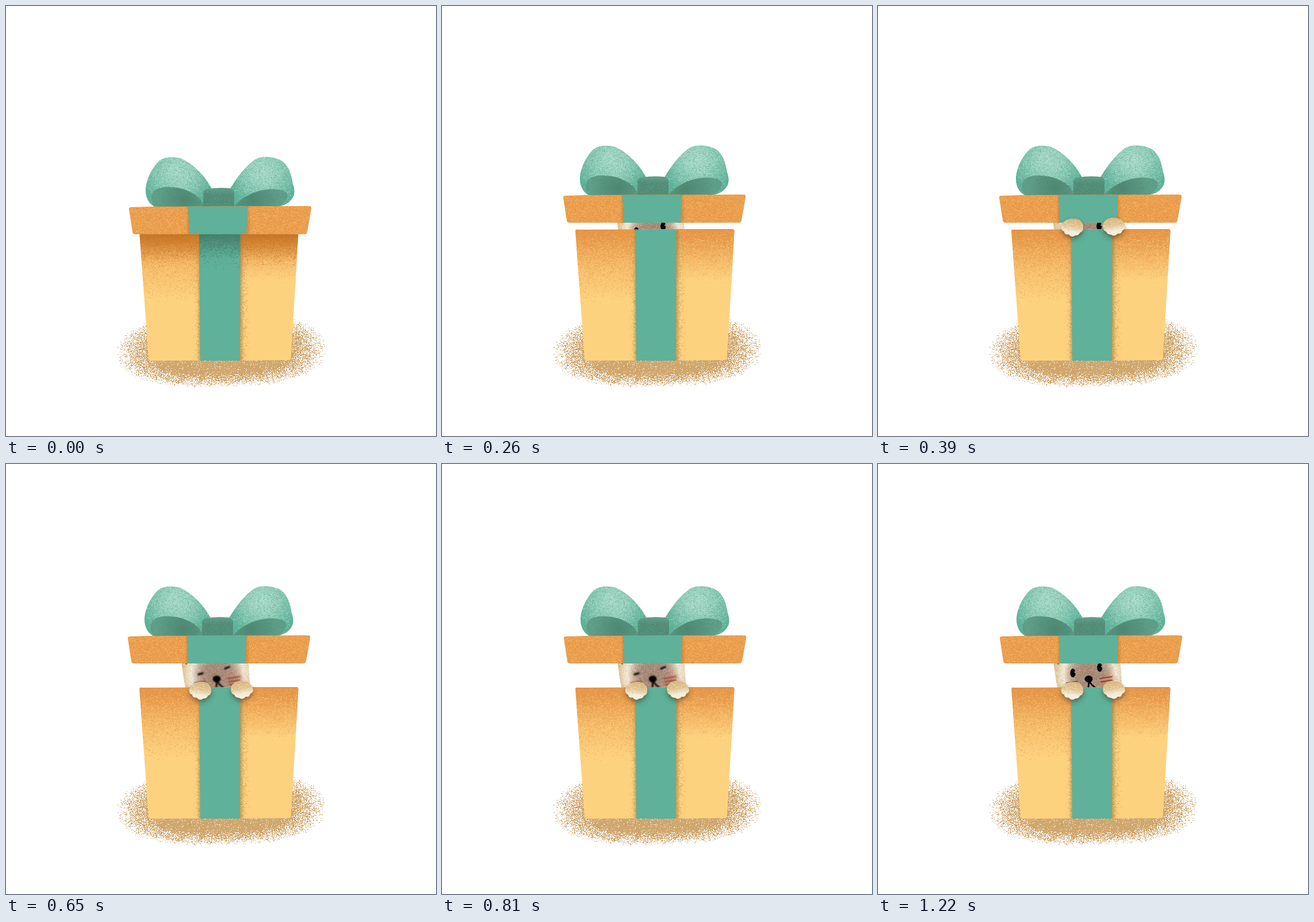
Write an HTML page with a canvas that moves like this. It is 748 px wide and 748 px high and loops after 1430 ms.

```html
<!DOCTYPE html>
<html lang="en">
<head>
<meta charset="utf-8">
<title>Gift box</title>
<style>
html, body { margin: 0; width: 100%; height: 100%; overflow: hidden; background: #fff; }
canvas { display: block; }
</style>
</head>
<body>
<canvas id="stage" width="748" height="748"></canvas>
<script>
const SIZE = 748;
const LOOP = 1430;
const TEAL = '#5fb199';
const stage = document.getElementById('stage').getContext('2d');
let g; // context of the layer being painted

let seed = 7;
function random() {
  seed = (Math.imul(seed, 1664525) + 1013904223) >>> 0;
  return seed / 4294967296;
}
const clamp = v => Math.max(0, Math.min(1, v));

function layer(paint) {
  const canvas = document.createElement('canvas');
  canvas.width = canvas.height = SIZE;
  g = canvas.getContext('2d');
  g.lineCap = 'round';
  paint();
  return canvas;
}

// Fill a path, then paint details clipped to it.
function shape(d, fill, details) {
  const path = new Path2D(d);
  g.save();
  g.fillStyle = fill;
  g.fill(path);
  g.clip(path);
  if (details) details();
  g.restore();
}

// Speckle a rectangle; density is a number or a function of x and y.
function grain(x0, y0, x1, y1, color, density) {
  g.fillStyle = color;
  for (let y = y0; y < y1; y++) {
    for (let x = x0; x < x1; x++) {
      const chance = density.call ? density(x, y) : density;
      if (random() < chance) g.fillRect(x, y, random() < 0.2 ? 2 : 1, 1);
    }
  }
}

function addStops(gradient, stops) {
  stops.forEach(([at, color]) => gradient.addColorStop(at, color));
  return gradient;
}
const linear = (x0, y0, x1, y1, ...stops) => addStops(g.createLinearGradient(x0, y0, x1, y1), stops);
const radial = (x, y, r, ...stops) => addStops(g.createRadialGradient(x, y, 0, x, y, r), stops);

function softEdge(x, y, width, height, alpha) {
  g.fillStyle = linear(x, 0, x + width, 0, [0, `rgba(135,95,45,${alpha})`], [1, 'rgba(135,95,45,0)']);
  g.fillRect(Math.min(x, x + width), y, Math.abs(width), height);
}

function line(color, width, ...points) {
  g.strokeStyle = color;
  g.lineWidth = width;
  g.beginPath();
  points.forEach(([x, y]) => g.lineTo(x, y));
  g.stroke();
}

function oval(x, y, rx, ry, color) {
  g.fillStyle = color;
  g.beginPath();
  g.ellipse(x, y, rx, ry, 0, 0, Math.PI * 2);
  g.fill();
}

const BODY = 'M232 392Q232 388 236 389L505 388Q509 388 508.5 393L495.5 613Q495 616 491 616L252 617Q249 617 248 613Z';
const RIBBON = 'M336 389H407.5L407 617H338Z';

const ground = layer(() => {
  const density = (x, y) => {
    const dx = Math.abs(x - 374) / 182;
    const dy = Math.abs(y - 599 + (x - 374) * 0.02) / 64;
    const edge = (dx ** 2.5 + dy ** 2.5) ** (1 / 2.5);
    return 0.93 * clamp((1 - edge) / 0.36) ** 1.1;
  };
  grain(190, 535, 558, 668, '#d0a76e', density);
  grain(190, 535, 558, 668, '#c2965a', (x, y) => density(x, y) * (1 - density(x, y)) * 0.25);
});

const body = layer(() => {
  shape(BODY, linear(0, 388, 0, 510, [0, '#e7974a'], [0.18, '#e89e50'], [0.6, '#f6bf6d'], [1, '#fdd27f']), () => {
    g.fillStyle = linear(0, 388, 0, 475, [0, '#e7974a'], [0.25, '#e89e50'], [0.65, '#f4ba69'], [1, '#fdd27f']);
    g.fillRect(375, 388, 140, 240);
    const fade = (x, y) => clamp((y - 388) / (x < 370 ? 135 : 95));
    grain(230, 388, 510, 525, 'rgba(224,140,58,.4)', (x, y) => 0.38 * (1 - fade(x, y)));
    grain(230, 388, 510, 525, 'rgba(255,214,130,.5)', (x, y) => 0.9 * fade(x, y) * (1 - fade(x, y)));
    grain(322, 400, 340, 617, 'rgba(205,155,85,.5)', x => clamp((x - 323) / 15) ** 2 * 0.7);
    grain(407, 400, 428, 617, 'rgba(205,155,85,.5)', x => clamp((427 - x) / 20) ** 2 * 0.75);
    softEdge(339, 389, -7, 228, 0.4);
    softEdge(406, 389, 8, 228, 0.4);
  });
  shape(RIBBON, TEAL);
});

// Shade that the closed lid casts on the box.
const lidShade = layer(() => {
  shape(BODY, linear(0, 395, 0, 445, [0, 'rgba(190,108,28,.8)'], [1, 'rgba(200,120,40,0)']), () =>
    grain(230, 395, 510, 460, 'rgba(196,116,38,.45)', (x, y) => 0.5 * clamp((455 - y) / 60)));
  shape(RIBBON, TEAL, () => {
    g.fillStyle = linear(0, 395, 0, 440, [0, 'rgba(62,115,97,.8)'], [1, 'rgba(70,130,110,0)']);
    g.fillRect(330, 389, 80, 60);
    grain(336, 395, 409, 465, 'rgba(66,122,103,.55)', (x, y) => 0.6 * clamp((460 - y) / 62) ** 1.5);
  });
});

function bowLoop(outer, inner, x, innerX) {
  shape(outer, radial(x, 288, 64, [0, '#a3d6c5'], [0.4, '#92cdb9'], [1, TEAL]), () => {
    const near = (px, py) => clamp(1 - Math.hypot(px - x, py - 288) / 72);
    grain(x - 65, 260, x + 70, 350, 'rgba(192,231,217,.5)', (px, py) => 0.4 * near(px, py));
    grain(x - 65, 260, x + 70, 350, 'rgba(78,163,136,.4)', 0.16);
  });
  shape(inner, radial(innerX, 337, 48, [0, '#4d8772'], [1, '#609f89']), () =>
    grain(x - 65, 312, x + 70, 350, 'rgba(70,130,110,.3)', 0.15));
}

const lid = layer(() => {
  bowLoop(
    'M258 349C247 343 242 331 243 316C245 300 254 281 267 269C277 262 292 262 304 265C325 274 345 294 358 318L350 349Z',
    'M258 349C251 340 252 326 261 319C272 313 292 314 307 318C325 324 340 333 344 349Z',
    298, 311);
  bowLoop(
    'M390 318C400 301 416 278 435 266C449 259 472 263 482 271C493 281 496 293 499 309C502 318 503 326 499 333C494 342 484 348 472 349H392Z',
    'M396 349C407 336 424 325 447 320C465 317 482 318 488 325C493 333 483 344 474 349Z',
    448, 428);
  shape('M343 350V326Q343 319 351 318Q370 315 389 317Q397 318 397 327V350Z',
    linear(0, 317, 0, 349, [0, '#609e89'], [0.35, '#518c77'], [1, '#518b77']), () =>
      grain(342, 316, 398, 350, 'rgba(106,171,148,.35)', 0.15));
  shape('M214 354Q213 350 218 350L250 349L527 348Q532 348 531 353L524 393Q523 397 519 397H225Q221 397 220 393Z', '#e99d4d', () => {
    grain(212, 347, 533, 398, 'rgba(250,192,112,.6)', 0.22);
    grain(212, 347, 533, 398, 'rgba(222,135,52,.4)', 0.18);
    softEdge(319, 348, -6, 50, 0.35);
    softEdge(418, 348, 8, 50, 0.35);
  });
  shape('M317 349H420L418 397H319Z', TEAL);
});

function paintEye(x, y) {
  oval(x, y, 4.6, 7.6, '#050403');
  shape(`M${x + 1.5} ${y - 2}L${x + 6} ${y - 4}V${y + 1}Z`, '#b49b8b');
}

function paintHead(blinking) {
  shape('M304 335L309 372Q312 400 330 420H410Q425 400 424 380L421 335Z',
    radial(368, 366, 63, [0, '#a0826f'], [0.4, '#a88d7c'], [0.56, '#c6b09c'],
      [0.72, '#f2e9d8'], [0.84, '#ecdcbd'], [1, '#dabb88']), () => {
      g.fillStyle = radial(399, 377, 20, [0, 'rgba(196,112,82,.55)'], [1, 'rgba(196,112,82,0)']);
      g.fillRect(375, 350, 50, 55);
      grain(303, 335, 426, 420, 'rgba(255,246,230,.25)', 0.15);
      grain(303, 335, 426, 420, 'rgba(130,95,70,.18)', 0.12);
    });
  oval(313.5, 347.5, 1.3, 1.3, '#6d5138');
  if (blinking) g.filter = 'blur(0.8px)';
  const whisker = (...points) => line('#8b4430', 2, ...points);
  whisker([328, 381], [347, 378]);
  whisker([386, 373], [407, 370]);
  whisker([388, 379], [407, 376]);
  if (blinking) {
    whisker([389, 384], [404, 382]);
    line('#15100d', 3.4, [335, 366], [342, 364]);
    line('#15100d', 3.4, [381, 356], [388, 353]);
  } else {
    paintEye(339, 363.7);
    paintEye(385.7, 354);
  }
  oval(366.5, 374, 7, 6, '#080605');
  line('#080605', 2.8, [367, 377], [366, 388]);
  line('#080605', 2.8, [368, 379], [372, 384], [378, 389]);
}
const awake = layer(() => paintHead(false));
const asleep = layer(() => paintHead(true));

function paintPaw(x, y, side) {
  g.save();
  g.translate(x, y);
  g.scale(side, 1);
  const d = 'M-19 2C-20 -9 -9 -15 2 -15C13 -15 19 -8 19 -1C19 5 17 8 13 9C12 13 8 14 5 14C1 17 -4 16 -6 12C-11 13 -14 11 -14 7Q-18 6 -19 2Z';
  g.shadowColor = 'rgba(75,55,25,.55)';
  g.shadowBlur = 8;
  g.shadowOffsetY = 5;
  g.fillStyle = '#ead6b4';
  g.fill(new Path2D(d));
  g.shadowColor = 'transparent';
  shape(d, linear(3, -15, -2, 15, [0, '#d8b47a'], [0.45, '#e3c899'], [0.75, '#f4eada'], [1, '#f8f3e8']), () => {
    grain(-20, -16, 20, 17, 'rgba(255,248,232,.4)', 0.15);
    grain(-20, -16, 20, 6, 'rgba(190,145,85,.25)', 0.15);
  });
  g.restore();
}
const paws = layer(() => {
  paintPaw(338, 394, 1);
  paintPaw(410.5, 392.5, -1);
});

// Held poses: start time, then the offsets of the visible parts.
const poses = [
  { at: 0, lid: [0, 0], closed: true },
  { at: 260, lid: [-3, -20], head: [-1, 29] },
  { at: 390, lid: [-3, -20], head: [-1, 29], paws: [0, -9] },
  { at: 520, lid: [-2, -41], head: [0, 9], paws: [0, 0] },
  { at: 650, lid: [-2, -50], head: [0, 0], paws: [0, 0], blink: true },
  { at: 910, lid: [-2, -50], head: [0, 0], paws: [0, 0] }
];

function render(time) {
  const pose = poses.findLast(p => p.at <= time % LOOP);
  stage.fillStyle = '#fff';
  stage.fillRect(0, 0, SIZE, SIZE);
  stage.drawImage(ground, 0, 0);
  if (pose.head) stage.drawImage(pose.blink ? asleep : awake, ...pose.head);
  stage.drawImage(body, 0, 0);
  if (pose.closed) stage.drawImage(lidShade, 0, 0);
  stage.drawImage(lid, ...pose.lid);
  if (pose.paws) stage.drawImage(paws, ...pose.paws);
}

let start;
function tick(now) {
  start ??= now;
  render(now - start);
  requestAnimationFrame(tick);
}
render(0);
requestAnimationFrame(tick);
</script>
</body>
</html>
```
